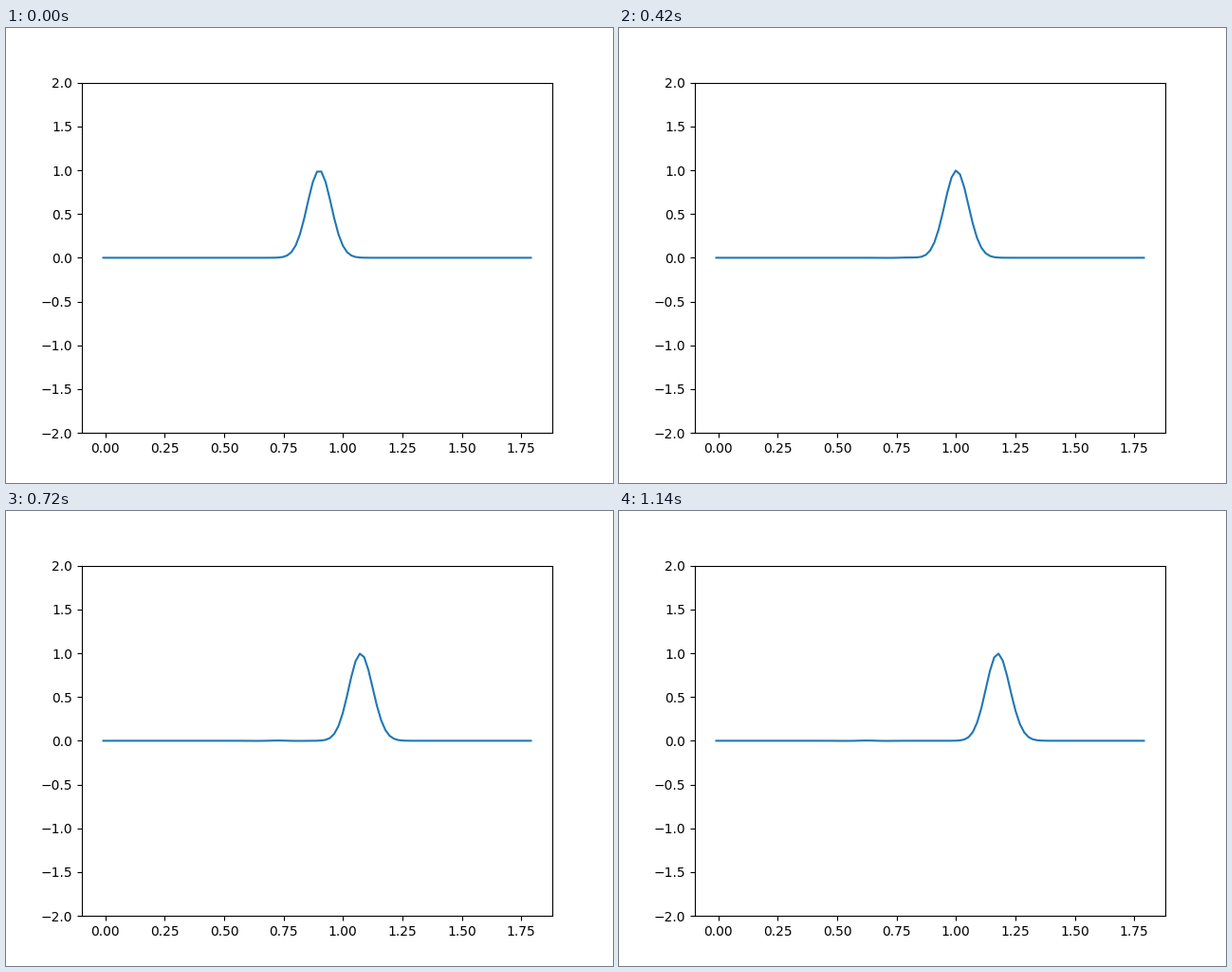
A matplotlib script for the animation above (1.2 s loop, 640 by 480 pixels).

```python
import numpy as np
import matplotlib.pyplot as plt
from matplotlib.animation import FuncAnimation

FRAMES = 20
INTERVAL = 60
DX = 0.018
COURANT = 0.812
CENTER, SIGMA = 0.9, 0.05

x = -DX / 2 + DX * np.arange(101)


def laplacian(u):
    out = np.zeros_like(u)
    out[1:-1] = u[2:] - 2 * u[1:-1] + u[:-2]
    return out


def simulate(steps):
    """Leapfrog solution of the wave equation for a right-moving pulse."""
    start = np.exp(-(x - CENTER) ** 2 / (2 * SIGMA ** 2))
    first = start - COURANT * np.gradient(start) + COURANT ** 2 / 2 * laplacian(start)
    states = [start, first]
    while len(states) < steps:
        previous, current = states[-2:]
        states.append(2 * current - previous + COURANT ** 2 * laplacian(current))
    return states


states = simulate(FRAMES)

fig, ax = plt.subplots(figsize=(6.4, 4.8), dpi=100)
line, = ax.plot(x, states[0])
ax.set_ylim(-2, 2)


def update(frame):
    line.set_ydata(states[frame])
    return line,


anim = FuncAnimation(fig, update, frames=FRAMES, interval=INTERVAL, repeat=True)
plt.show()
```
